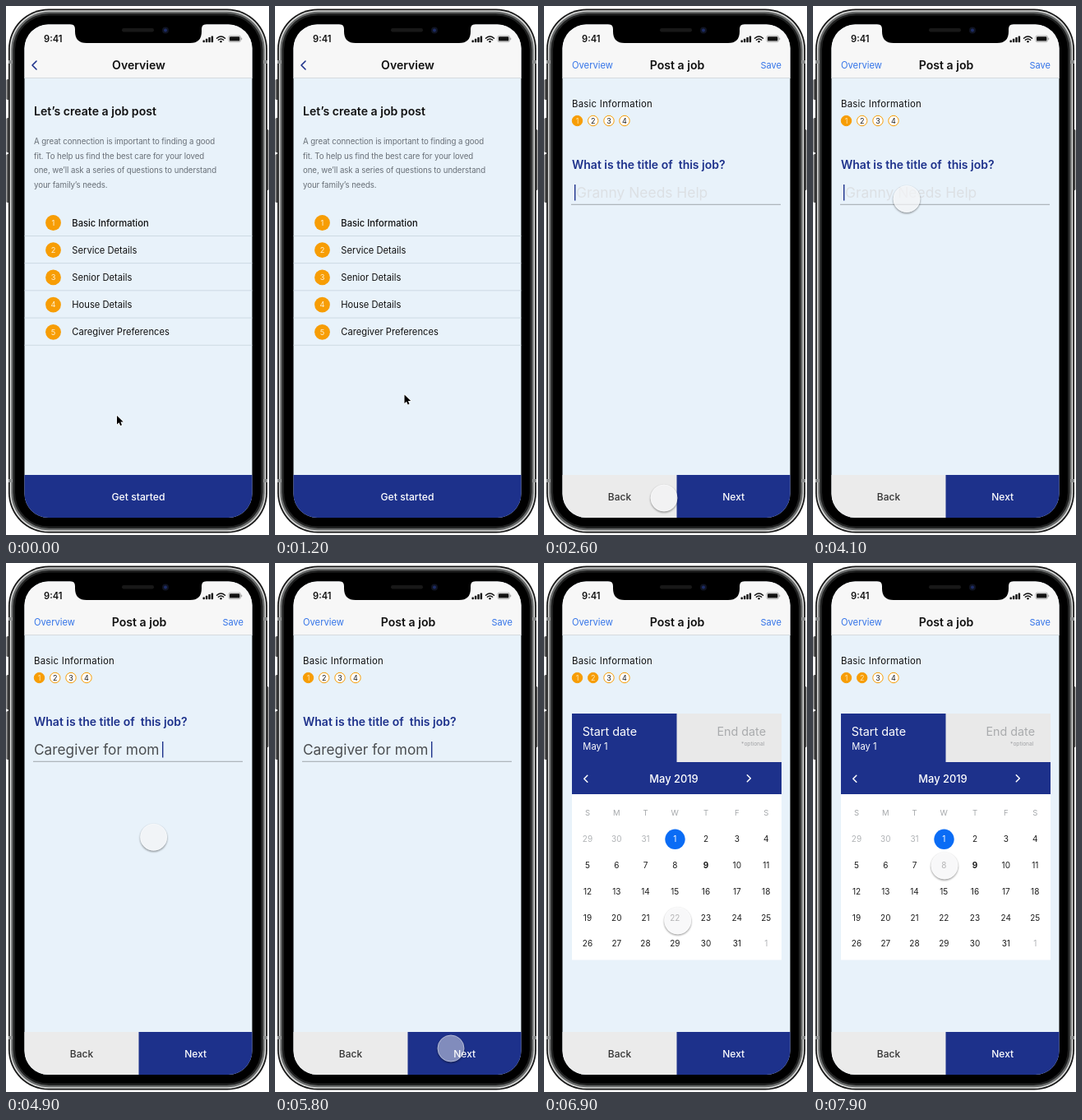
Write an HTML page that moves like this. It is 320 by 643 pixels and loops after 8 s.

```html
<!DOCTYPE html>
<html lang="en">
<head>
<meta charset="utf-8">
<title>Job post prototype</title>
<style>
  html, body { margin: 0; width: 100%; height: 100%; overflow: hidden; background: #fff; }
  svg { display: block; width: 100%; height: 100%; }
  text { font-family: Inter, "Open Sans", sans-serif; white-space: pre; }
</style>
</head>
<body>
<svg id="stage" viewBox="0 0 320 643"></svg>
<script>
const NAVY = '#1d318b', ORANGE = '#f79d05', LINK = '#3474e8';
const LOOP = 8000, STEP = 100;

const rect = (x, y, w, h, fill, r = 0, more = '') =>
  `<rect x="${x}" y="${y}" width="${w}" height="${h}" rx="${r}" fill="${fill}" ${more}/>`;
const circle = (x, y, r, fill, more = '') =>
  `<circle cx="${x}" cy="${y}" r="${r}" fill="${fill}" ${more}/>`;
const line = (d, color, width) =>
  `<path d="${d}" fill="none" stroke="${color}" stroke-width="${width}" stroke-linecap="round" stroke-linejoin="round"/>`;
const text = (s, x, y, size, fill = '#111', weight = 400, anchor = 'start', gap = 0) =>
  `<text x="${x}" y="${y}" font-size="${size}" fill="${fill}" font-weight="${weight}" text-anchor="${anchor}" letter-spacing="${gap}">${s}</text>`;
const mid = (s, x, y, size, fill, weight) => text(s, x, y, size, fill, weight, 'middle');
const group = (id, body) => `<g id="${id}">${body}</g>`;

function phone() {
  return rect(.5, 89, 4, 25, '#555', 1.5) + rect(.5, 136, 4, 42, '#555', 1.5) +
    rect(.5, 180, 4, 59, '#555', 1.5) + rect(315.5, 150, 4, 74, '#555', 1.5) +
    rect(3, 3.5, 315, 637, '#161616', 49) +
    rect(4.7, 5.2, 311.6, 633.6, '#d9dad9', 47.5) +
    rect(6.3, 6.8, 308.4, 630.4, '#686a6a', 46) +
    rect(8.5, 9, 304, 626, '#202121', 44) +
    [66, 575].map(y => rect(3, y, 5, 4, '#8c8e8e') + rect(313, y, 5, 4, '#8c8e8e')).join('') +
    rect(11, 11.5, 299, 621, '#000', 41);
}

function statusBar() {
  const bars = [0, 1, 2, 3].map(i => rect(239.5 + i * 3.4, 41.5 - i * 1.7, 2.4, 2.7 + i * 1.7, '#111', .6)).join('');
  return rect(22, 22, 278, 66, '#f7f7f7') + rect(22, 87, 278, .8, '#cfd5da') +
    text('9:41', 46, 44, 11.2, '#111', 600) + bars +
    line('M256.5 39.2Q261.5 34.8 266.5 39.2M258.4 41.3Q261.5 38.7 264.6 41.3', '#111', 1.5) +
    circle(261.5, 43.3, 1.2, '#111') +
    rect(270.9, 36.1, 14.6, 7.6, 'none', 2, 'stroke="#999" stroke-width=".7"') +
    rect(272, 37.2, 12.4, 5.4, '#111', 1.2) + rect(286.2, 38.6, 1, 2.6, '#999', .5);
}

function notch() {
  return '<path d="M78 22Q84 22 84 28V31Q84 45 98 45H224Q238 45 238 31V28Q238 22 244 22Z"/>' +
    rect(141, 27, 39, 4.5, '#181818', 2.2) + circle(194, 29.5, 4, '#101422') + circle(194, 29.5, 2, '#1d2c66');
}

function overview() {
  const intro = ['A great connection is important to finding a good', 'fit. To help us find the best care for your loved',
    'one, we’ll ask a series of questions to understand', 'your family’s needs.'];
  const items = ['Basic Information', 'Service Details', 'Senior Details', 'House Details', 'Caregiver Preferences'];
  return line('M37 67L32 72L37 77', NAVY, 1.6) + mid('Overview', 161.5, 77, 14.1, '#111', 600) +
    text('Let’s create a job post', 34, 132.5, 14.1, '#111', 600) +
    intro.map((s, i) => text(s, 34, 168 + i * 17.7, 9.7, '#686f77', 400, 'start', -.08)).join('') +
    items.map((s, i) => {
      const y = 263.5 + i * 33.2;
      return circle(57.5, y, 9.4, ORANGE) + mid(i + 1, 57.5, y + 3.3, 9.3, '#fff0cf') +
        text(s, 80.3, y + 4.1, 11.2, '#111', i ? 400 : 500) + rect(22, 279 + i * 33.2, 278, .9, '#cad7e1');
    }).join('') +
    rect(22, 570, 278, 54, NAVY) + mid('Get started', 161, 601, 12.2, '#fff', 500);
}

// Shared frame of the question pages; `done` is the number of filled dots.
function formPage(done) {
  const dots = [40.5, 59.7, 79, 98].map((x, i) =>
    circle(x, 139.5, 6.2, i < done ? ORANGE : '#fff', `stroke="${ORANGE}" stroke-width="1"`) +
    mid(i + 1, x, 142.8, 9, i < done ? '#ffe6b3' : '#222')).join('');
  return text('Overview', 34, 76, 11.2, LINK) + mid('Post a job', 162, 77, 14.1, '#111', 600) +
    text('Save', 289, 76, 11, LINK, 400, 'end') +
    text('Basic Information', 34, 123, 11.4, '#111', 400, 'start', .25) + dots +
    rect(22, 570, 140, 54, '#ebebeb') + rect(161.5, 570, 139, 54, NAVY) +
    mid('Back', 92, 601, 12, '#333', 500) + mid('Next', 230.7, 601, 12, '#fff', 500);
}

function titlePage() {
  return formPage(1) +
    text('What is the title of\u00a0 this job?', 34, 198.3, 14, NAVY, 600) +
    rect(33, 240.8, 255, .9, '#979da3') +
    group('empty', text('Granny Needs Help', 39, 233.2, 17.4, '#dce0e4') + rect(37, 217, 1.4, 19.5, NAVY)) +
    group('filled', text('Caregiver for mom', 34, 233.2, 17.3, '#4a4d50') + rect(190, 217, 1.4, 19.5, NAVY));
}

function datePage() {
  const cols = [53, 88.3, 123.5, 159.3, 197, 234.8, 270.2];
  let grid = cols.map((x, i) => mid('SMTWTFS'[i], x, 307.3, 9.5, '#a5a8ab')).join('') + circle(159.5, 335.8, 12.2, '#0a6cf5');
  for (let n = 0; n < 35; n++) {
    const day = n - 2, out = day < 1 || day > 31;
    const label = day < 1 ? day + 31 : day > 31 ? day - 31 : day;
    const fill = out ? '#b0b3b6' : day === 1 ? '#fff' : '#1c1c1c';
    grid += mid(label, cols[n % 7], 339.4 + Math.floor(n / 7) * 31.7, 10, fill, day === 9 ? 700 : 400);
  }
  return formPage(2) +
    rect(34, 183, 255, 299.5, '#fff') + rect(161, 183, 128, 59, '#e9e9e9') +
    rect(34, 183, 127.5, 59.5, NAVY) + rect(34, 242, 255, 39, NAVY) +
    text('Start date', 46.7, 209.5, 14.4, '#fff') + text('May 1', 47.3, 227, 11.2, '#fff') +
    text('End date', 270, 209.5, 14.3, '#a9abad', 400, 'end') + text('*optional', 268.3, 222.3, 6.6, '#a0a2a5', 400, 'end') +
    mid('May 2019', 158, 266.8, 12.9, '#fff', 500) +
    line('M52.8 258.3L48.8 262.3L52.8 266.3M247.3 257.8L251.3 261.8L247.3 265.8', '#fff', 1.5) + grid;
}

const stage = document.getElementById('stage');
stage.innerHTML = `<defs>
  <clipPath id="screen">${rect(22.5, 22.5, 277, 599.5, '#000', 29)}</clipPath>
  <filter id="shade" x="-50%" y="-50%" width="200%" height="200%"><feGaussianBlur stdDeviation="1.3"/></filter>
  <mask id="ring">${rect(-30, -30, 60, 60, '#fff')}${circle(0, 0, 16.3, '#000')}</mask></defs>` +
  phone() +
  `<g clip-path="url(#screen)">${rect(22, 22, 278, 601, '#e8f2fa')}${statusBar()}` +
  group('overview', overview()) + group('title', titlePage()) + group('dates', datePage()) + '</g>' + notch() +
  group('arrow', '<path d="M0 0V10.4L2.5 8.2L4.2 12L6 11.2L4.4 7.5H7.7Z" stroke="#fff" stroke-width="1.2" paint-order="stroke"/>') +
  group('touch', `<g mask="url(#ring)">${circle(0, 1.2, 16.5, '#000', 'opacity=".4" filter="url(#shade)"')}</g>` +
    circle(0, 0, 16.3, '#f6f6f7', 'id="disc"') + circle(0, 0, 16, 'none', 'stroke="#fff" stroke-opacity=".5" stroke-width=".8"'));

const el = id => document.getElementById(id);
const show = (id, on) => el(id).setAttribute('display', on ? 'inline' : 'none');

// Pointer stops: time, x, y
const ARROW = [[0, 135, 498], [800, 135, 498], [1200, 157.5, 472.5], [1400, 168, 505], [1700, 142, 589],
  [1900, 126, 592], [2200, 146, 595]];
const TOUCH = [[2500, 146, 598], [2900, 146, 598], [3500, 97, 137], [3700, 97, 140], [4100, 114, 234.5],
  [4700, 110, 214], [5150, 277, 500], [5400, 214, 590], [6500, 214, 590], [7400, 91, 218], [7850, 160, 368]];

function at(path, t) {
  const i = path.findIndex(p => p[0] > t);
  if (i < 0) return path[path.length - 1].slice(1);
  if (i === 0) return path[0].slice(1);
  const [a, b] = [path[i - 1], path[i]];
  const k = (t - a[0]) / (b[0] - a[0]), e = k * k * (3 - 2 * k);
  return [a[1] + (b[1] - a[1]) * e, a[2] + (b[2] - a[2]) * e];
}

function draw(t) {
  show('overview', t < 2500);
  show('title', t >= 2500 && t < 5900);
  show('dates', t >= 5900);
  show('empty', t < 4400);
  show('filled', t >= 4400);
  show('arrow', t < 2500);
  show('touch', t >= 2500);
  el('arrow').setAttribute('transform', `translate(${at(ARROW, t)})`);
  el('touch').setAttribute('transform', `translate(${at(TOUCH, t)})`);
  el('disc').setAttribute('opacity', t >= 5700 && t < 5900 ? .46 : .7);
}

const start = performance.now();
function tick() {
  const t = (performance.now() - start) % LOOP;
  draw(Math.floor(t / STEP) * STEP);
  requestAnimationFrame(tick);
}
tick();
</script>
</body>
</html>
```
